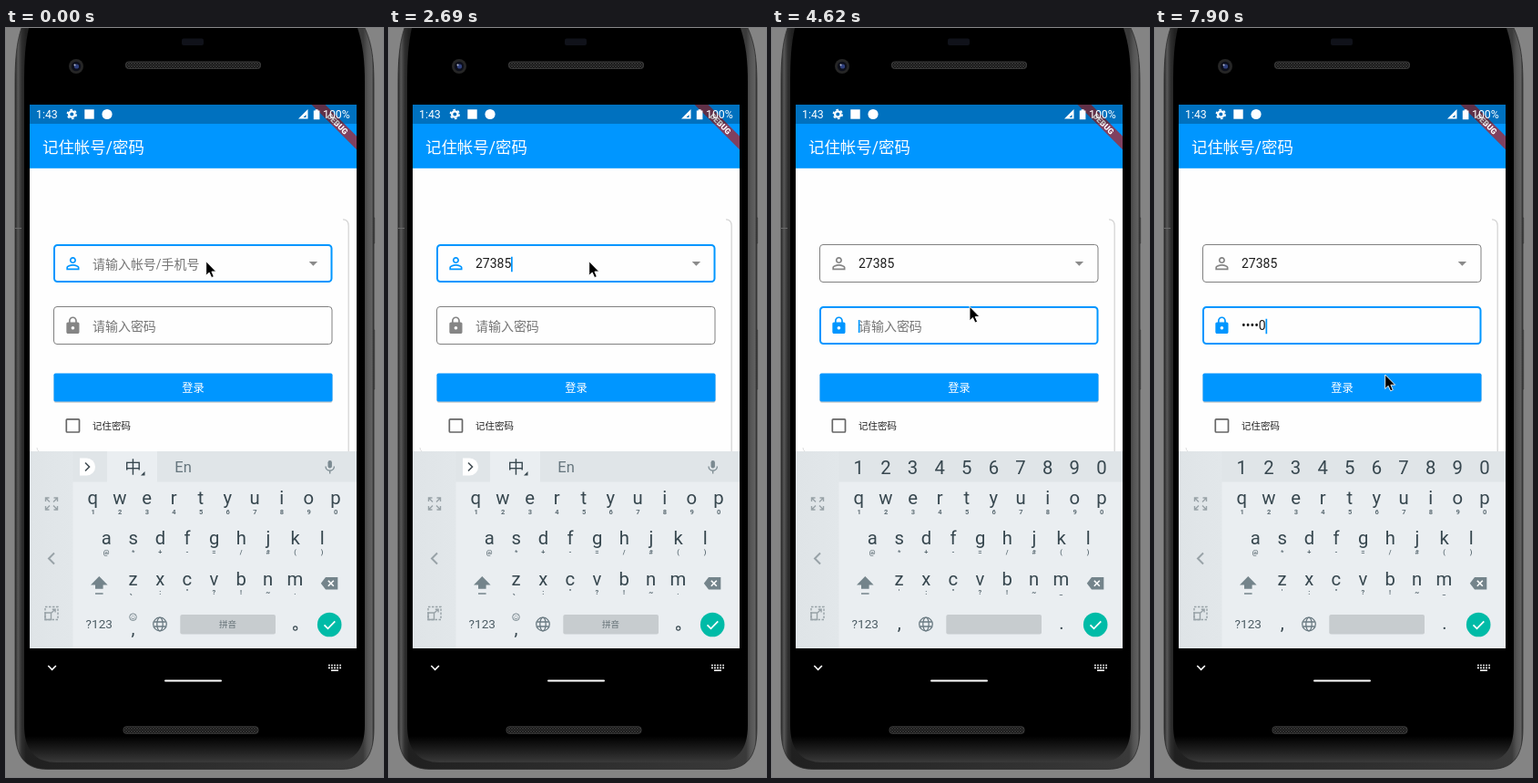
These frames come from a looping animation (414 px wide and 821 px high, 8000 ms). An HTML page:

```html
<!DOCTYPE html>
<html lang="zh-CN">
<head>
<meta charset="utf-8">
<title>记住帐号/密码</title>
<style>
  html, body { margin: 0; width: 100%; height: 100%; overflow: hidden; background: #848484; }
  svg { display: block; width: 414px; height: 821px; }
  text { font-family: Roboto, "Noto Sans CJK SC", "Noto Sans CJK", sans-serif; }
  .mid { text-anchor: middle; }
  .f14 { font-size: 13.97px; }
  .key { font-size: 20.3px; fill: #37474f; text-anchor: middle; }
  .sub { font-size: 7.5px; fill: #5d6c74; text-anchor: middle; font-weight: 700; }
  .line { fill: none; }
</style>
</head>
<body>
<svg viewBox="0 0 414 821">
  <defs>
    <linearGradient id="rim">
      <stop offset="0" stop-color="#2a2a2a"/><stop offset=".008" stop-color="#585858"/>
      <stop offset=".018" stop-color="#303030"/><stop offset=".03" stop-color="#202020"/>
      <stop offset=".97" stop-color="#3a3a3a"/><stop offset=".982" stop-color="#545454"/>
      <stop offset=".994" stop-color="#606060"/><stop offset="1" stop-color="#333"/>
    </linearGradient>
    <linearGradient id="glass" x1="0" y1="776" x2="0" y2="806" gradientUnits="userSpaceOnUse">
      <stop offset="0"/><stop offset=".6" stop-color="#222"/><stop offset="1" stop-color="#3c3c3c"/>
    </linearGradient>
    <linearGradient id="side">
      <stop offset="0" stop-color="#dfe4e7"/><stop offset="1" stop-color="#e2e7ea"/>
    </linearGradient>
    <pattern id="mesh" width="3" height="3" patternUnits="userSpaceOnUse">
      <rect width="3" height="3" fill="#161616"/><path d="M0 0L3 3M3 0L0 3" stroke="#3c3c3c" stroke-width=".7"/>
    </pattern>
    <clipPath id="screen"><rect x="26" y="84" width="359" height="596"/></clipPath>
    <path id="person" d="M12 5.9c1.16 0 2.1.94 2.1 2.1s-.94 2.1-2.1 2.1S9.9 9.16 9.9 8s.94-2.1 2.1-2.1m0 9c2.97 0 6.1 1.46 6.1 2.1v1.1H5.9V17c0-.64 3.13-2.1 6.1-2.1M12 4C9.79 4 8 5.79 8 8s1.79 4 4 4 4-1.79 4-4-1.79-4-4-4zm0 9c-2.67 0-8 1.34-8 4v3h16v-3c0-2.66-5.33-4-8-4z"/>
    <path id="lock" d="M18 8h-1V6c0-2.76-2.24-5-5-5S7 3.24 7 6v2H6c-1.1 0-2 .9-2 2v10c0 1.1.9 2 2 2h12c1.1 0 2-.9 2-2V10c0-1.1-.9-2-2-2zm-6 9c-1.1 0-2-.9-2-2s.9-2 2-2 2 .9 2 2-.9 2-2 2zm3.1-9H8.9V6c0-1.71 1.39-3.1 3.1-3.1s3.1 1.39 3.1 3.1v2z"/>
  </defs>

  <!-- phone body -->
  <rect width="414" height="821" fill="#848484"/>
  <path d="M402 208h2.700v28H402zM402 331h2.700v65H402z" fill="#777" stroke="#444" stroke-width=".8"/>
  <path d="M17 0C12 15 10 32 10 60V768C10 800 22 812.500 46 812.500H368C392 812.500 404 800 404 768V60C404 32 401 15 394 0Z" fill="url(#rim)" stroke="#2c2c2c" stroke-width=".8"/>
  <path d="M25 0C21 18 20 36 20 60V764C20 792 32 805 56 805H358C382 805 394 792 394 764V60C394 36 392 18 386 0Z" fill="url(#glass)"/>
  <path d="M10 219.500h7" stroke="#6a6a6a"/>
  <rect x="193" y="11.500" width="24" height="7.500" rx="2" fill="#10121a"/>
  <circle cx="77" cy="42" r="8" fill="#262626"/>
  <circle cx="77" cy="42" r="5.200" fill="#0d0f1a"/>
  <circle cx="77.500" cy="42" r="2.600" fill="#30407c"/>
  <circle cx="75.500" cy="40.500" r="1" fill="#bcc4dc"/>
  <rect x="131.500" y="37" width="148" height="7.500" rx="3" fill="url(#mesh)" stroke="#3a3a3a"/>
  <rect x="129" y="765.800" width="148" height="7.500" rx="3" fill="url(#mesh)" stroke="#3a3a3a"/>

  <!-- page -->
  <rect x="26" y="84" width="359" height="380" fill="#fefefe"/>
  <rect x="26" y="84" width="359" height="69.800" fill="#0096ff"/>
  <text x="40" y="137.200" font-size="17.460" fill="#fff">记住帐号/密码</text>
  <g clip-path="url(#screen)">
    <g transform="translate(385 84) rotate(45)">
      <rect x="-34.900" y="24.400" width="69.800" height="10.500" fill="#b71c1c" fill-opacity=".7"/>
      <text class="mid" y="32.800" font-size="8.900" font-weight="900" fill="#fff">DEBUG</text>
    </g>
  </g>
  <rect x="26" y="84" width="359" height="21" fill="#000" fill-opacity=".25"/>
  <g fill="#fff">
    <text x="33" y="99" font-size="12.300">1:43</text>
    <text x="348" y="99" font-size="12.300">100%</text>
    <circle cx="72.300" cy="94.500" r="3.200" fill="none" stroke="#fff" stroke-width="2.300"/>
    <circle cx="72.300" cy="94.500" r="4.900" fill="none" stroke="#fff" stroke-width="1.600" stroke-dasharray="2.600 2.530"/>
    <rect x="86.300" y="89.300" width="10.400" height="10.400"/>
    <circle cx="111" cy="94.500" r="5.600"/>
    <path d="M331.500 89v10.500H321zM339.600 89.300h3v1.200h1.800v9.800h-6.600v-9.800h1.800z"/>
    <path d="M329.500 95v3h-3z" fill="#0070bf"/>
  </g>
  <path d="M370 209.800Q376.200 210 376.200 217V464" fill="none" stroke="#d6d6d6" stroke-width="1.300"/>
  <path d="M34 460q.2 3 2 4" fill="none" stroke="#ddd"/>

  <g id="fields"></g>
  <path d="M332.700 256h9.400l-4.700 4.700z" fill="#8a8a8a"/>
  <rect x="52.500" y="379.300" width="306" height="31.500" rx="2" fill="#000" fill-opacity=".2"/>
  <rect x="52.500" y="378.400" width="306" height="31.200" rx="1.800" fill="#0096ff"/>
  <text class="mid" x="205.500" y="399" font-size="12.200" fill="#fff">登录</text>
  <rect x="66.300" y="428.800" width="14.200" height="14.200" rx="1" fill="none" stroke="#666" stroke-width="1.700"/>
  <text x="95" y="439.700" font-size="10.470" fill="#222">记住密码</text>

  <!-- keyboard -->
  <rect x="26" y="464" width="359" height="216" fill="#eaeef1"/>
  <rect x="73" y="464" width="312" height="33.500" fill="#e0e5e8"/>
  <rect x="26" y="464" width="47.500" height="216" fill="url(#side)"/>
  <g class="line" stroke="#98a2a7" stroke-width="1.400">
    <path d="M43.500 519v-4h4M52.500 515h4v4M56.500 524v4h-4M47.500 528h-4v-4M44 515.500l4 4M56 515.500l-4 4M56 527.500l-4-4M44 527.500l4-4"/>
    <path d="M53 575.500l-6 6 6 6" stroke-width="2"/>
    <rect x="43" y="634.500" width="14" height="14" stroke-dasharray="2.500 1.500"/>
    <path d="M43 641h6.500v7.500H43zM50 641l4-4M50.800 637.300h3.300v3.300"/>
  </g>
  <g id="keys"></g>
  <path d="M102.300 601l9.300 9.500h-5v4.300h-8.600v-4.300h-5zM98 619.300h8.600v1.500H98z" fill="#74848b"/>
  <path d="M351 602h13.300v13.500H351l-5.200-6.700z" fill="#74848b"/>
  <path d="M353.800 605.800l6 6m0-6l-6 6" class="line" stroke="#fff" stroke-width="1.600"/>
  <text class="mid" x="102.300" y="658.300" font-size="13.600" fill="#4c5c64">?123</text>
  <g class="line" stroke="#6b7b83" stroke-width="1.300">
    <circle cx="169" cy="653.500" r="7.300"/><ellipse cx="169" cy="653.500" rx="3.200" ry="7.300"/>
    <path d="M162.500 651h13M162.500 656h13"/>
  </g>
  <rect x="191.300" y="643" width="104.700" height="21.500" rx="2" fill="#c7cccf"/>
  <circle cx="355.200" cy="654" r="13.300" fill="#00bba7"/>
  <path d="M349.500 654.300l4 4 7.800-8" class="line" stroke="#fff" stroke-width="1.700"/>

  <g id="zh">
    <rect x="111" y="464" width="55" height="34" fill="#eaeef1"/>
    <path d="M81 471.500h7.500a9.500 9.500 0 0 1 0 19H81z" fill="#fff"/>
    <path d="M87 476.500l4.500 4.500-4.500 4.500" class="line" stroke="#444f55" stroke-width="1.600"/>
    <text class="mid" x="139.500" y="488" font-size="18.500" fill="#37474f">中</text>
    <path d="M152.500 486v4.500H148z" fill="#37474f"/>
    <text class="mid" x="194.500" y="487" font-size="16.500" fill="#65757d">En</text>
    <rect x="353.500" y="474" width="4.400" height="8.500" rx="2.200" fill="#7b8a91"/>
    <path d="M351 480.500a4.700 4.700 0 0 0 9.400 0M355.700 485.500v3" class="line" stroke="#7b8a91" stroke-width="1.300"/>
    <g class="line" stroke="#6b7b83" stroke-width=".9">
      <circle cx="139.500" cy="645.700" r="3.800"/>
      <path d="M137.500 646.500q2 2.600 4 0M138 644.500h.9M140.200 644.500h.9"/>
    </g>
    <text class="key" x="139.500" y="665">,</text>
    <text class="mid" x="243.500" y="657" font-size="9.600" fill="#68747a">拼音</text>
    <circle cx="317.700" cy="658" r="2.100" class="line" stroke="#37474f" stroke-width="1.100"/>
  </g>
  <g id="en">
    <text class="key" x="139.800" y="658.500">,</text>
    <text class="key" x="318" y="658.500">.</text>
  </g>

  <!-- navigation -->
  <g class="line" stroke="#fff">
    <path d="M46.300 699l4.300 4.300 4.300-4.300" stroke-width="1.600"/>
    <path d="M175 715.500h61" stroke-width="2" stroke-linecap="round"/>
    <path d="M354 698.500h14M354 701.300h14" stroke-width="1.700" stroke-dasharray="1.800 1.250"/>
    <path d="M357 704.200h8" stroke-width="1.500"/>
  </g>

  <circle id="ring" cx="228.500" cy="316" r="10.200" fill="none" stroke="#111"/>
  <path id="mouse" d="M0 0V15.500L3.500 12.300L6 17.800L8.600 16.700L6.200 11.200H11Z" fill="#000" stroke="#fff" stroke-width=".9"/>
</svg>
<script>
const $ = id => document.getElementById(id);
const BLUE = '#0096ff', LOOP = 8000, DIGIT = 7.84, DOT = 4.71;
const ACCOUNT = '27385';
const FIELD_Y = { user: 258, pass: 326 };

const field = (id, icon, hint) => {
  const y = FIELD_Y[id];
  return `
  <rect id="${id}Box" class="line" rx="3.5"/>
  <use id="${id}Icon" href="#${icon}" transform="translate(62.8 ${y - 10.5}) scale(.885)"/>
  <text id="${id}Hint" class="f14" x="95" y="${y + 5.9}" fill="#757575">${hint}</text>
  <text id="${id}Text" class="f14" x="95" y="${y + 5.3}" fill="#1c1c1c"></text>`;
};
$('fields').innerHTML =
  field('user', 'person', '请输入帐号/手机号') +
  field('pass', 'lock', '请输入密码') +
  `<rect id="caret" width="1.7" fill="${BLUE}"/>`;

// keyboard rows
const row = (keys, x, y, cls) => [...keys].map((k, i) =>
  `<text class="${cls}" x="${x + i * 29.62}" y="${y}">${k}</text>`).join('');
$('keys').innerHTML =
  row('qwertyuiop', 95.3, 522, 'key') + row('1234567890', 95.6, 532.5, 'sub') +
  row('asdfghjkl', 110.2, 566, 'key') + row('@*+-=/#', 110, 577, 'sub') +
  row('zxcvbnm', 139.6, 611, 'key');
$('zh').innerHTML += row('()', 317.5, 577, 'sub') + row('、:"?!~.', 139.6, 621, 'sub');
$('en').innerHTML += row('1234567890', 95.3, 489, 'key') +
  row('()', 317.5, 577, 'sub') + row('\':"?!~_', 139.6, 621, 'sub');

// each step changes part of the state
const START = { user: 0, pass: 0, fade: 1, caret: 0, focus: 'user', kb: 'zh', mouse: [219.7, 255.8], ring: 0 };
const STEPS = [
  [300, { caret: 1 }], [750, { caret: 0 }], [1190, { caret: 1 }],
  [1640, { user: 1, fade: .38 }], [1790, { fade: 0 }],
  [2090, { user: 2 }], [2240, { user: 3 }], [2390, { user: 4 }], [2690, { user: 5 }],
  [2840, { mouse: [220.5, 262] }], [2990, { mouse: [223, 282] }],
  [3140, { mouse: [226, 304], caret: 0 }], [3280, { mouse: [227, 315] }],
  [3430, { ring: 1 }], [3580, { ring: 0, focus: 'pass', fade: 1 }],
  [3730, { kb: 'en', caret: 1 }], [4180, { caret: 0 }],
  [4470, { mouse: [221, 309] }], [4620, { mouse: [217, 305.3], caret: 1 }],
  [4920, { mouse: [218, 305.5] }], [5060, { mouse: [218.7, 306], caret: 0 }],
  [5510, { caret: 1 }], [5810, { pass: 1, fade: .38 }], [5960, { fade: 0 }],
  [6260, { caret: 0 }], [6560, { pass: 2, caret: 1 }], [6710, { pass: 3 }], [6860, { pass: 4 }],
  [7310, { caret: 0 }], [7760, { pass: 5, caret: 1, mouse: [234, 340] }],
  [7900, { mouse: [252.7, 380] }]
];

const set = (id, attrs) => {
  for (const k in attrs) $(id).setAttribute(k, attrs[k]);
};
const show = (id, on) => set(id, { visibility: on ? 'visible' : 'hidden' });

function drawField(id, s, text) {
  const on = s.focus === id, w = on ? 2 : 1;
  // the border grows inwards from a fixed outer edge
  set(id + 'Box', {
    x: 52 + w / 2, y: FIELD_Y[id] - 21 + w / 2, width: 306.5 - w, height: 42 - w,
    stroke: on ? BLUE : '#808080', 'stroke-width': w
  });
  set(id + 'Icon', { fill: on ? BLUE : '#858585' });
  set(id + 'Hint', { opacity: on ? s.fade : text ? 0 : 1 });
  $(id + 'Text').textContent = text;
}

function draw(t) {
  const s = Object.assign({}, START, ...STEPS.filter(p => p[0] <= t).map(p => p[1]));
  drawField('user', s, ACCOUNT.slice(0, s.user));
  drawField('pass', s, s.pass ? '•'.repeat(s.pass - 1) + '0' : '');

  const n = s[s.focus];
  const w = s.focus === 'user' ? n * DIGIT : n && (n - 1) * DOT + DIGIT;
  const h = n ? 16.5 : 14;
  set('caret', { x: 94.8 + w, y: FIELD_Y[s.focus] + 1 - h / 2, height: h });
  show('caret', s.caret);
  show('zh', s.kb === 'zh');
  show('en', s.kb === 'en');
  show('ring', s.ring);
  set('mouse', { transform: `translate(${s.mouse})` });
}

const t0 = performance.now();
function tick() {
  draw((performance.now() - t0) % LOOP);
  requestAnimationFrame(tick);
}
tick();
</script>
</body>
</html>
```
